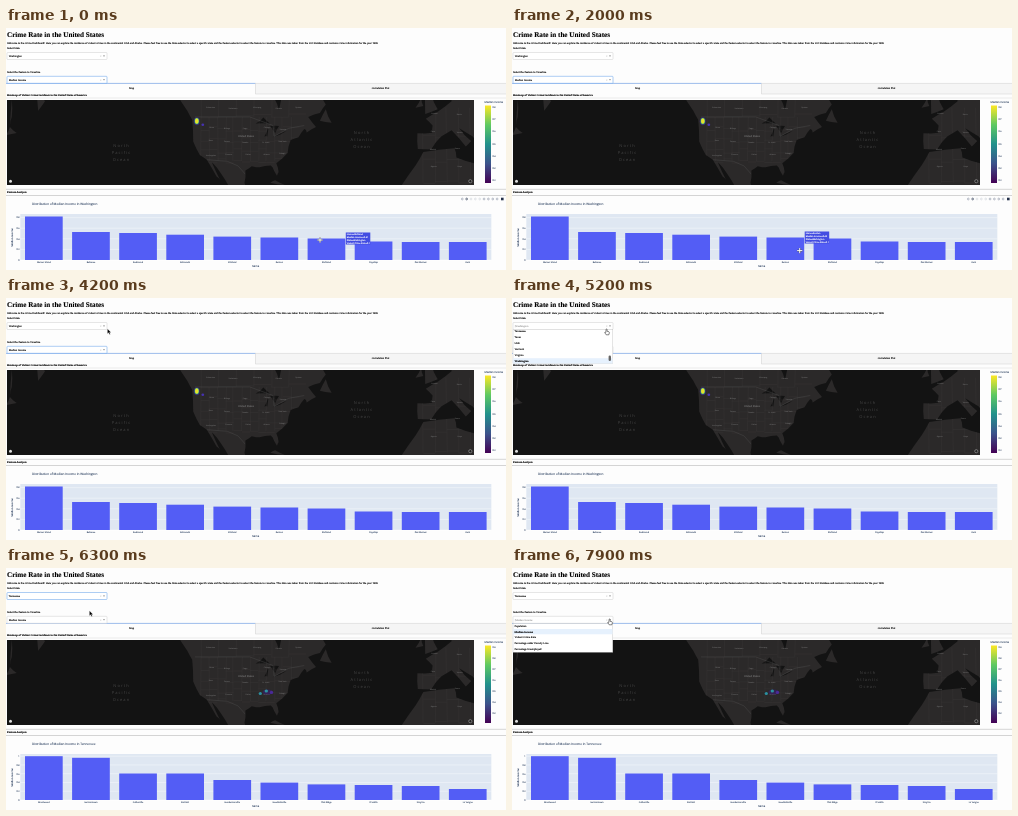
These frames come from a looping animation (500 by 242 pixels, 8000 ms). An HTML page:

```html
<!DOCTYPE html>
<html lang="en">
<head>
<meta charset="utf-8">
<title>Crime dashboard</title>
<style>
html, body { margin: 0; width: 100%; height: 100%; overflow: hidden; background: #fdfdfd; }
svg { display: block; width: 500px; height: 242px; }
text { font-family: "Liberation Serif", serif; font-size: 2.74px; fill: #000; stroke: #000; stroke-width: .1px; text-rendering: geometricPrecision; }
.b { font-weight: bold; }
.h1 { font-size: 7.15px; font-weight: bold; }
.s { font-family: "Open Sans", sans-serif; font-size: 2.19px; fill: #2a3f5f; stroke: #2a3f5f; stroke-width: .07px; }
.axis { font-size: 2.55px; }
.title { font-size: 3.1px; }
.tip { fill: #fff; stroke: #fff; stroke-width: .12px; }
.place { font-size: 1.8px; fill: #858585; stroke: none; }
.country { font-size: 2.6px; fill: #999; }
.ocean { font-size: 4px; letter-spacing: 1.1px; fill: #464646; stroke: none; }
.dim { fill: #666; stroke: none; }
.mid { text-anchor: middle; }
.end { text-anchor: end; }
</style>
</head>
<body>
<svg id="stage" viewBox="0 0 500 242" xmlns="http://www.w3.org/2000/svg"></svg>
<script>
const LOOP = 8000, STEP = 100;
const stage = document.getElementById('stage');

const text = (x, y, s, cls = '', extra = '') => `<text x="${x}" y="${y}" class="${cls}" ${extra}>${s}</text>`;
const rect = (x, y, w, h, fill, extra = '') => `<rect x="${x}" y="${y}" width="${w}" height="${h}" fill="${fill}" ${extra}/>`;
const line = (x1, y1, x2, y2, c, w = .5) => `<path d="M${x1} ${y1}L${x2} ${y2}" stroke="${c}" stroke-width="${w}"/>`;
const path = (d, attrs = '') => `<path d="${d}" ${attrs}/>`;
const group = (id, body, extra = '') => `<g id="${id}" ${extra}>${body}</g>`;
const repeat = (n, fn) => Array.from({ length: n }, (_, i) => fn(i)).join('');

let seed = 7;
const jitter = size => {
  seed = seed * 16807 % 2147483647;
  return (seed / 2147483647 - .5) * size;
};

// Web Mercator, 1.95 px per degree
const project = (lon, lat) => {
  const m = Math.log(Math.tan(Math.PI / 4 + lat * Math.PI / 360)) * 180 / Math.PI;
  return [190.5 + (lon + 122.3) * 1.95, 93.3 + (54.1 - m) * 1.95];
};
const points = s => s.match(/\S+ \S+/g).map(p => project(...p.split(' ').map(Number)));
const trace = pts => 'M' + pts.map(p => p.map(v => v.toFixed(1)).join(' ')).join('L');

// Closed outline with a bent midpoint on each side, for a ragged coast
const coast = s => {
  const pts = points(s);
  return trace(pts.flatMap((p, i) => {
    const q = pts[(i + 1) % pts.length];
    return [p, [(p[0] + q[0]) / 2 + jitter(1.2), (p[1] + q[1]) / 2 + jitter(1.2)]];
  })) + 'Z';
};

const land = [
  '-133 57 -127 51 -124.5 48 -124 40 -120.6 34.5 -117 32.5 -112 25 -110 23 -114.5 31.5 -109.5 26 -105.5 20 -96 18 -97.7 22 -97.2 27.7 -94 29.6 -90 29.2 -84.2 30 -82.7 28 -81 25.3 -80.2 27 -81.4 31 -75.6 35.4 -74 40.6 -70 41.7 -67 44.8 -65.8 43.5 -61 45.5 -65 49 -59 50.3 -56 53 -60 57 -78 57 -80 51.3 -82.5 55 -85 57',
  '8 57 8.5 54 1.6 50.8 -4.7 48.4 -1.2 46 -1.5 43.4 -9 43.2 -8.8 37 -2 36.8 3.2 42 8.5 44.3 15.8 38 18.5 40.2 12.4 45 19.4 42 24 36 24 57',
  '-17 18 -17 21 -10 30 -6 35.8 10 37.3 11 33.5 20 31 24 32 24 18',
  '-5 50 1.4 51.5 -2 56 -5 57', '-10 52 -6 52.5 -7 55', '-59 47.7 -56 51.5 -53 47', '-84.5 22 -82 23.2 -77 21',
  '-220 42.5 -214.5 43.3 -218 45.5', '-218 46 -217 49 -217 54.5', '-203.5 51 -200 54 -204 57'
].map(coast).join('');
const lakes = ['-92 46.7 -88 48.8 -84.6 46.6', '-87.5 42 -86 42 -85.3 45.8', '-84.5 45.8 -80 45.8 -82 43.2', '-83.3 41.7 -79 42.8 -76.3 44'].map(coast).join('');
const nations = ['-123 49 -95 49 -83 46 -82.5 42 -75 45 -67 46', '-117 32.5 -106.5 31.8 -101 29.8 -97.2 26'].map(s => trace(points(s))).join('');

// Irregular grid of inner borders
const borders = (lon, lat, cols, rows, dLon, dLat) => repeat(cols, i => {
  const x = lon + i * dLon;
  return trace([project(x + jitter(1), lat), project(x + jitter(1), lat + rows * dLat)]) + repeat(rows, k => {
    const y = lat + k * dLat + jitter(2);
    return trace([project(x, y), project(x + dLon, y)]);
  });
});

const places = (names, x, y, cols, dx, dy) => names.split(',').map((s, i) =>
  text(x + i % cols * dx + jitter(4), y + Math.floor(i / cols) * dy + jitter(2), s, 's place mid')).join('');
const ocean = (x, y, name) => name.split(' ').map((w, i) => text(x, y + i * 7, w, 's ocean mid')).join('');
const glow = (x, y, rx, ry, c, o = 1) => `<ellipse cx="${x}" cy="${y}" rx="${rx}" ry="${ry}" fill="${c}" opacity="${o}"/>`;

const map = group('map',
  rect(1, 72, 467, 85, '#131313') + path(land, 'fill="#2b2929"') + path(lakes, 'fill="#131313"') +
  group('borders', path(
    borders(-120, 32, 12, 4, 4.2, 4.25) + borders(-120, 49, 6, 1, 9, 8) + borders(-6, 22, 5, 3, 6, 10),
    'fill="none" stroke="#3d3b3b" stroke-width=".3"') + path(nations, 'fill="none" stroke="#504e4e" stroke-width=".4"'),
    'clip-path="url(#landBox)"') +
  ocean(115.5, 118.5, 'North Pacific Ocean') + ocean(356, 106, 'North Atlantic Ocean') +
  places('Edmonton,Saskatoon,Winnipeg,Ontario,Quebec', 206, 80, 5, 22, 8) +
  places('Boise,Billings,Fargo,Chicago,Toronto,Reno,Denver,Omaha,St. Louis,New York,Los Angeles,Phoenix,Dallas,Atlanta,Raleigh', 204, 101, 5, 18.5, 13) +
  places('London,Berlin,Paris,Vienna,Madrid,Rome,Algeria,Libya', 428, 87, 2, 25, 17) + text(240, 108.5, 'United States', 's place country mid'),
  'clip-path="url(#mapBox)"');

const heatWest = glow(190.8, 93.3, 3, 4, '#3b2a86', .8) + glow(196.8, 96.7, 1.4, 1.3, '#4632b0') +
  glow(190.8, 93.1, 2.2, 3.2, '#35b779') + glow(190.8, 93, 1.8, 2.7, '#e8e02c');
const heatSouth = glow(261.5, 124, 5, 2.6, '#3b1c78', .55) + glow(265.5, 124.4, 1.7, 1.6, '#4a2a98') +
  glow(254.3, 125.5, 1.6, 1.5, '#2b8fa0') + glow(260.3, 123, 1.7, 1.5, '#2c93a0');

// Bar chart: heights in px above the axis
const FLOOR = 232, PITCH = 47.1, BAR = 37.7;
const barX = i => 19 + PITCH * i;
const cities = {
  Washington: 'Mercer Island,Bellevue,Redmond,Edmonds,Kirkland,Renton,Richland,Puyallup,Des Moines,Kent'.split(','),
  Tennessee: 'Brentwood,Germantown,Collierville,Bartlett,Hendersonville,Goodlettsville,Oak Ridge,Franklin,Smyrna,La Vergne'.split(',')
};
const heights = {
  Washington: [43.5, 28, 27, 25.3, 23.4, 22.5, 21.5, 18.5, 18, 18],
  Tennessee: [43.8, 42.2, 26.5, 26.5, 20, 17.4, 15.6, 15, 14, 11]
};
const chart = (state, tickGap, ticks) =>
  text(26, 177.4, `Distribution of Median Income in ${state}`, 's title') +
  repeat(ticks, i => {
    const y = FLOOR - i * tickGap;
    return line(14.3, y, 485.3, y, '#fff', .35) + text(13.5, y + .8, +(i * .2).toFixed(1), 's end');
  }) +
  heights[state].map((h, i) => rect(barX(i), FLOOR - h, BAR, h, '#535df5') +
    text(barX(i) + BAR / 2, 234.8, cities[state][i], 's mid')).join('');

const scaleTicks = (top, y, gap) => repeat(7, i => text(486.5, y + gap * i, (top - i * .1).toFixed(1), 's'));

const tooltip = (i, income) => {
  const x = barX(i) + BAR + .5, y = FLOOR - heights.Washington[i] - 6;
  return rect(x, y, 24.5, 12, '#434de2') +
    [`Name=${cities.Washington[i]}`, `Median Income=${income}`, 'State=Washington', 'Violent Crime Rate=0.1']
      .map((s, k) => text(x + 1, y + 2.6 + k * 2.8, s, 's tip')).join('');
};

const select = (y, id, value) =>
  rect(1, y, 100, 7, '#fff', `id="${id}Box" stroke-width=".5" rx=".7"`) + text(2.8, y + 4.5, value, '', `id="${id}Text"`) +
  text(94, y + 4.4, '×', 'dim') + path(`M97 ${y + 3}h2l-1 1.2z`, 'fill="#777"');

const menu = (y, items, active) =>
  rect(1, y, 99.8, items.length * 5.9 - .9, '#fff', 'stroke="#bbb" stroke-width=".4"') +
  items.map((s, i) => {
    const on = i === active, top = y - .5 + i * 5.9;
    return (on ? rect(1.3, Math.max(top, y), 99.2, 5.3, '#e6f1fd') : '') + text(2.6, top + 3.5, s, on ? 'b' : '');
  }).join('');

const stateItems = ['Tennessee', 'Texas', 'Utah', 'Vermont', 'Virginia', 'Washington'];
const featureItems = ['Population', 'Median Income', 'Violent Crime Rate', 'Percentage under Poverty Line', 'Percentage Unemployed'];
const thumb = rect(96.6, 57.5, 2.4, 5.5, '#666', 'rx="1.2"');

const modebar = repeat(9, i => {
  const tone = i === 1 ? '#39455e' : i > 1 && i < 5 ? '#d5d8de' : '#9aa1b0';
  return `<circle cx="${456.3 + i * 4.35}" cy="171" r=".9" fill="none" stroke="${tone}" stroke-width=".7"/>`;
}) + rect(495, 169.7, 2.6, 2.6, '#23304a');

const plus = 'M-2.6 0H2.6M0 -2.6V2.6';
const cursors =
  group('cross', path(plus, 'stroke="#444" stroke-width="1.6"') + path(plus, 'stroke="#fff" stroke-width="1"')) +
  group('arrow', path('M-1.6 -2.2V2.8L-.4 1.7L.5 3.6L1.4 3.2L.5 1.4H2.1Z', 'fill="#000" stroke="#fff" stroke-width=".3"')) +
  group('hand', path('M-.9 -2.8Q-.3 -3.3 .1 -2.6V-.7L2 -.2Q2.5 0 2.4 .8L1.8 2.8H-.8L-2.3 .6Q-2.2 -.3 -1.1 .4Z', 'fill="#fff" stroke="#111" stroke-width=".5"'));

const viridis = ['#fde725', '#5ec962', '#21918c', '#3b528b', '#440154'];

stage.innerHTML =
  `<defs><clipPath id="mapBox">${rect(1, 72, 467, 85, '#000')}</clipPath><clipPath id="landBox">${path(land)}</clipPath>
   <linearGradient id="scale" x2="0" y2="1">${viridis.map((c, i) => `<stop offset="${i / 4}" stop-color="${c}"/>`).join('')}</linearGradient></defs>` +
  text(1, 9, 'Crime Rate in the United States', 'h1') +
  text(1, 16.4, 'Welcome to the Crime Dashboard! Here you can explore the incidence of violent crimes in the continental USA and Alaska. Please feel free to use the State selector to select a specific state and the Feature selector to select the feature to visualize. This data was taken from the UCI database and contains crime information for the year 1995') +
  text(1, 21.4, 'Select State') + text(1, 45.4, 'Select the Feature to Visualize') +
  rect(249.5, 55.3, 250.5, 10.7, '#f5f5f5') + line(0, 55.4, 249.5, 55.4, '#5b8fe0', .6) + line(249.5, 55.4, 500, 55.4, '#ccc') +
  line(249.5, 55.4, 249.5, 66, '#ccc') + line(249.5, 66, 500, 66, '#ccc') +
  text(125.5, 61.4, 'Map', 'mid') + text(374.5, 61.4, 'Correlation Plot', 'mid') +
  text(1, 67.5, 'Heatmap of Violent Crime Incidence in the United States of America', 'b') +
  line(0, 70, 500, 70, '#ccc', .4) +
  map + group('heatWest', heatWest) + group('heatSouth', heatSouth) +
  '<circle cx="4.5" cy="153.2" r="1.5" fill="#ddd"/><circle cx="464.3" cy="153.2" r="1.6" fill="#222" stroke="#bbb" stroke-width=".5"/>' +
  text(478.6, 75, 'Median Income', 's axis') + rect(479, 77.5, 6, 77.5, 'url(#scale)') +
  group('scaleWest', scaleTicks(.8, 80, 12.2)) + group('scaleSouth', scaleTicks(.9, 80, 11)) +
  line(0, 161.3, 500, 161.3, '#aaa') + text(1, 165.2, 'Feature Analysis', 'b') + line(0, 167.5, 500, 167.5, '#aaa') +
  rect(14.3, 186, 471, 46, '#dfe7f2') +
  group('west', chart('Washington', 10.6, 5)) + group('south', chart('Tennessee', 8.76, 6)) +
  text(0, 0, 'Median Income', 's axis mid', 'transform="translate(7 209.5) rotate(-90)"') +
  text(249.5, 238.5, 'Name', 's axis mid') +
  group('modebar', modebar) + group('tipA', tooltip(6, '0.41')) + group('tipB', tooltip(5, '0.42')) +
  select(24.5, 'state', 'Washington') + select(48.3, 'feature', 'Median Income') +
  group('menuLast', menu(31.2, stateItems, 5) + thumb) + group('menuFirst', menu(31.2, stateItems, 0) + thumb) +
  group('menuFeature', menu(55.6, featureItems, 1)) +
  group('cursor', cursors);

const el = id => document.getElementById(id);
const show = (id, on) => { el(id).style.display = on ? '' : 'none'; };

// time, x, y
const track = [
  [0, 314, 212], [1000, 314, 212.5], [1300, 313.5, 218.5], [2400, 273, 225], [3000, 273, 225], [3800, 135, 58],
  [4200, 103, 33], [5200, 95, 34], [5700, 84, 34], [6300, 85, 45], [7500, 98, 54], [LOOP, 98, 54]
];
const cursorAt = t => {
  const i = track.findIndex(k => k[0] > t), [t0, x0, y0] = track[i - 1], [t1, x1, y1] = track[i];
  const p = (t - t0) / (t1 - t0);
  return [x0 + (x1 - x0) * p, y0 + (y1 - y0) * p];
};

function setSelect(id, value, focused, open) {
  el(id + 'Box').setAttribute('stroke', focused && !open ? '#5a9be6' : '#ccc');
  el(id + 'Text').textContent = (open ? '|' : '') + value;
  el(id + 'Text').setAttribute('class', open ? 'dim' : '');
}

function draw(t) {
  const [x, y] = cursorAt(t);
  const overChart = y > 186, south = t >= 5900;
  const stateOpen = t >= 4900 && t < 5700, featureOpen = t >= 7500;
  const hand = (t >= 4400 && t < 5800) || t >= 7100;

  el('cursor').setAttribute('transform', `translate(${x.toFixed(2)} ${y.toFixed(2)})`);
  show('cross', overChart);
  show('hand', hand);
  show('arrow', !overChart && !hand);

  for (const id of ['west', 'heatWest', 'scaleWest']) show(id, !south);
  for (const id of ['south', 'heatSouth', 'scaleSouth']) show(id, south);
  show('modebar', t < 3400);
  show('tipA', overChart && x > 297);
  show('tipB', overChart && x <= 297);

  show('menuLast', stateOpen && t < 5400);
  show('menuFirst', stateOpen && t >= 5400);
  show('menuFeature', featureOpen);
  setSelect('state', t < 5700 ? 'Washington' : 'Tennessee', t >= 4900 && !featureOpen, stateOpen);
  setSelect('feature', 'Median Income', t < 4900, featureOpen);
}

const start = performance.now();
function tick() {
  const t = (performance.now() - start) % LOOP;
  draw(Math.floor(t / STEP) * STEP);
  requestAnimationFrame(tick);
}
tick();
</script>
</body>
</html>
```
